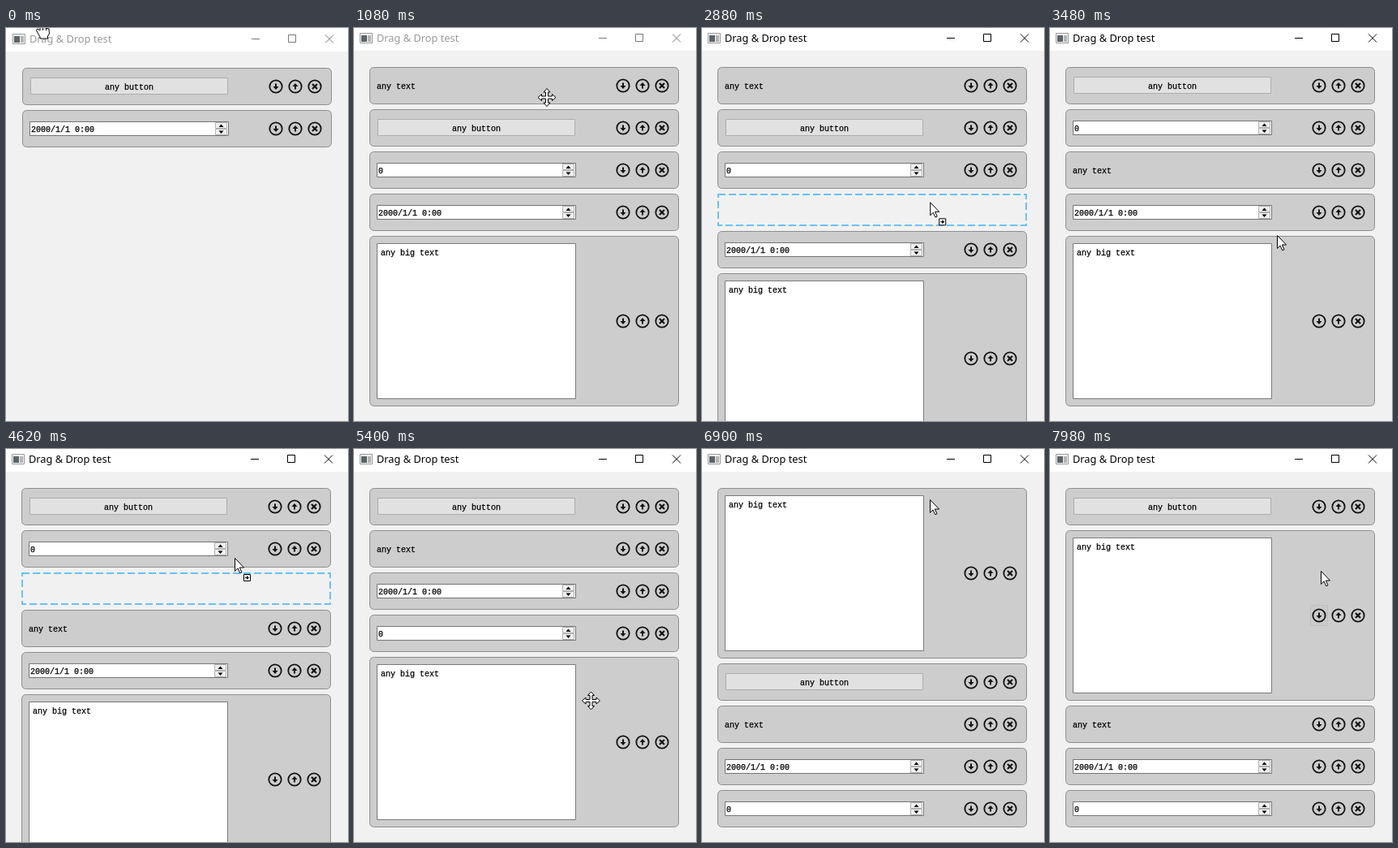
Recreate the animation shown at these times as an HTML page with a canvas. Size 422 by 484 pixels, loop 8000 ms.

```html
<!DOCTYPE html>
<html lang="en">
<head>
<meta charset="utf-8">
<title>Drag &amp; Drop test</title>
<style>
html, body { margin: 0; width: 422px; height: 484px; overflow: hidden; background: #f1f1f1; }
canvas { display: block; }
</style>
</head>
<body>
<canvas id="stage" width="422" height="484"></canvas>
<script>
const ctx = document.getElementById('stage').getContext('2d');
const LOOP = 8000, STEP = 60;

// Rows: b button, d date, s spin box, t text, m multi-line text.
// [start, row order, placeholder slot]
const layouts = [
  [0, 'bd'], [60, 'tbsdm'],
  [2220, 'tbsdm', 1], [2640, 'tbsdm', 2], [2880, 'tbsdm', 3], [3480, 'bstdm'],
  [4620, 'bstdm', 2], [4980, 'bstdm', 3], [5160, 'bstdm', 4], [5340, 'btdsm'],
  [5940, 'btdsm', 4], [6180, 'btdsm', 3], [6300, 'btdsm', 2], [6480, 'btdsm', 1],
  [6660, 'btdsm', 0], [6900, 'mbtds'], [7920, 'bmtds']
];

// [time, cursor, x, y]
const pointer = [
  [0, 'hand', 45, -8], [60, 'arrow', 60, 12], [240, 'move', 120, 66], [300, 'move', 133, 76],
  [660, 'move', 133, 76], [1320, 'move', 298, 91], [1500, 'move', 298, 91],
  [1560, 'move', 298.5, 88], [1980, 'move', 298.5, 88], [2040, 'move', 298.5, 87],
  [2160, 'move', 298.5, 87], [2220, 'drag', 288, 84], [3000, 'drag', 280, 238],
  [3120, 'drag', 280, 255], [3480, 'arrow', 280, 255], [3540, 'arrow', 280, 255],
  [3600, 'move', 284, 256], [3720, 'move', 287, 257], [3840, 'move', 287, 257],
  [4020, 'move', 288, 203], [4140, 'move', 288, 203], [4320, 'move', 293, 142],
  [4560, 'move', 293, 142], [4620, 'drag', 282, 134], [5280, 'drag', 281, 304],
  [5340, 'arrow', 281, 306], [5400, 'move', 292.5, 310], [5760, 'move', 303, 356],
  [5880, 'move', 303, 356], [5940, 'drag', 296, 346], [6420, 'drag', 281, 117],
  [6720, 'drag', 281, 62], [6900, 'arrow', 281, 62], [6960, 'move', 286, 65],
  [7560, 'arrow', 322, 147], [7680, 'arrow', 334, 150], [LOOP, 'arrow', 334, 150]
];

const lastStarted = (list, t) => list.findLastIndex(item => item[0] <= t);

function box(x, y, w, h, fill, stroke, radius = 0) {
  ctx.beginPath();
  ctx.roundRect(x + .5, y + .5, w - 1, h - 1, radius);
  ctx.lineWidth = 1;
  if (fill) { ctx.fillStyle = fill; ctx.fill(); }
  if (stroke) { ctx.strokeStyle = stroke; ctx.stroke(); }
}

function polygon(points, fill, stroke) {
  ctx.beginPath();
  points.forEach(([x, y]) => ctx.lineTo(x, y));
  ctx.closePath();
  ctx.fillStyle = fill;
  ctx.fill();
  if (stroke) { ctx.lineWidth = 1; ctx.strokeStyle = stroke; ctx.stroke(); }
}

function lines(color, width, ...segments) {
  ctx.beginPath();
  for (const [x1, y1, x2, y2] of segments) { ctx.moveTo(x1, y1); ctx.lineTo(x2, y2); }
  ctx.strokeStyle = color;
  ctx.lineWidth = width;
  ctx.stroke();
}

function at(x, y, draw) {
  ctx.save();
  ctx.translate(x, y);
  draw();
  ctx.restore();
}

function label(text, x, y) {
  ctx.font = '10px "Liberation Mono", monospace';
  ctx.fillStyle = ctx.strokeStyle = '#000';
  ctx.lineWidth = .25;
  ctx.fillText(text, x, y);
  ctx.strokeText(text, x, y);
}

function titleBar(active) {
  ctx.fillStyle = '#fff';
  ctx.fillRect(-1, -1, 424, 29);
  box(7, 6, 16, 13, '#f4f4f4', '#9a9a9a');
  ctx.fillStyle = '#5c6468';
  ctx.fillRect(9, 9, 7, 8);
  ctx.fillStyle = '#b4b4b4';
  ctx.fillRect(17, 9, 4, 8);
  ctx.font = '12.8px "Noto Sans", sans-serif';
  ctx.fillStyle = active ? '#000' : '#999';
  ctx.fillText('Drag & Drop test', 28, 17);
  const color = active ? '#000' : '#777';
  lines(color, 1, [302, 12.5, 312, 12.5], [393, 7.5, 403, 17.5], [403, 7.5, 393, 17.5]);
  box(347, 7, 10, 10, null, color);
}

function spinBox(text) {
  box(28, 14, 246, 18, '#fff', '#747474');
  box(257, 15, 15, 8, '#f0f0f0', '#b0b0b0');
  box(257, 23, 15, 8, '#f0f0f0', '#b0b0b0');
  polygon([[261.5, 21], [264.5, 17.5], [267.5, 21]], '#000');
  polygon([[261.5, 25.5], [264.5, 29], [267.5, 25.5]], '#000');
  label(text, 30, 27);
}

const contents = {
  b() { box(29, 12, 244, 21, '#e1e1e1', '#adadad'); label('any button', 121, 27); },
  d() { spinBox('2000/1/1 0:00'); },
  s() { spinBox('0'); },
  t() { label('any text', 28, 27); },
  m() { box(28, 9, 246, 192, '#fff', '#7a7a7a'); label('any big text', 33, 24); }
};

function roundIcon(x, y, glyph) {
  at(x, y, () => {
    ctx.beginPath();
    ctx.arc(0, 0, 7.7, 0, 7);
    ctx.strokeStyle = '#111';
    ctx.lineWidth = 1.8;
    ctx.stroke();
    glyph();
  });
}

function arrowGlyph(dir) {
  lines('#111', 2, [0, -3.5 * dir, 0, 1 * dir]);
  polygon([[-3.5, 0], [3.5, 0], [0, 4 * dir]], '#111');
}

function row(kind, focused) {
  const h = kind === 'm' ? 210 : 46;
  box(19, 0, 382, h, '#cdcdcd', '#8e8e8e', 5);
  contents[kind]();
  if (focused && kind === 'm') box(321, h / 2 - 13, 22, 26, '#cacaca', '#bfbfbf');
  roundIcon(332, h / 2, () => arrowGlyph(1));
  roundIcon(356, h / 2, () => arrowGlyph(-1));
  roundIcon(380, h / 2, () => lines('#111', 2.2, [-3, -3, 3, 3], [3, -3, -3, 3]));
  return h;
}

function placeholder(y) {
  ctx.setLineDash([9, 4]);
  ctx.strokeStyle = '#66c2f8';
  ctx.lineWidth = 2;
  ctx.strokeRect(20, y + 1, 380, 38);
  ctx.setLineDash([]);
}

function rows([, order, slot], focused) {
  let y = 48;
  [...order].forEach((kind, i) => {
    if (i === slot) { placeholder(y); y += 46; }
    at(0, y, () => { y += row(kind, focused) + 6; });
  });
}

const cursors = {
  arrow() {
    polygon([[.5, .5], [.5, 16.5], [4, 13], [6.8, 18.8], [9, 17.8], [6.3, 12], [11.5, 12]], '#fff', '#000');
  },
  drag() {
    cursors.arrow();
    box(11, 20, 9, 9, '#fff', '#000');
    lines('#000', 1, [13, 24.5, 17, 24.5]);
    polygon([[15, 22], [18, 24.5], [15, 27]], '#000');
  },
  move() {
    const arm = [[-1.5, -1.5], [-1.5, -6.5], [-4, -6.5], [0, -11], [4, -6.5], [1.5, -6.5]];
    const points = [];
    for (let i = 0, turn = arm; i < 4; i++, turn = turn.map(([x, y]) => [-y, x])) points.push(...turn);
    polygon(points, '#fff', '#000');
  },
  hand() {
    polygon([[-3, 11], [-3, 0], [0, 0], [0, 7], [4, 8], [8, 9], [8.5, 15], [6.5, 18], [6.5, 21],
      [-3, 21], [-3, 19], [-7.5, 11], [-6.5, 9], [-4.5, 10]], '#fff', '#000');
    lines('#000', 1, [.5, 7, .5, 11], [4.5, 8, 4.5, 11]);
  }
};

function drawPointer(t) {
  const i = lastStarted(pointer, t);
  const [start, kind, x, y] = pointer[i], [end, , nextX, nextY] = pointer[i + 1];
  const p = (t - start) / (end - start);
  at(x + (nextX - x) * p, y + (nextY - y) * p, cursors[kind]);
}

function render(now) {
  const t = Math.floor(now % LOOP / STEP) * STEP;
  const shift = t < 60 ? 1 : 0;
  ctx.fillStyle = '#f1f1f1';
  ctx.fillRect(0, 0, 422, 484);
  at(shift, shift, () => {
    titleBar(t >= 1920);
    rows(layouts[lastStarted(layouts, t)], t >= 7800);
  });
  drawPointer(t);
}

const begin = performance.now();
function tick() {
  render(performance.now() - begin);
  requestAnimationFrame(tick);
}
tick();
</script>
</body>
</html>
```
